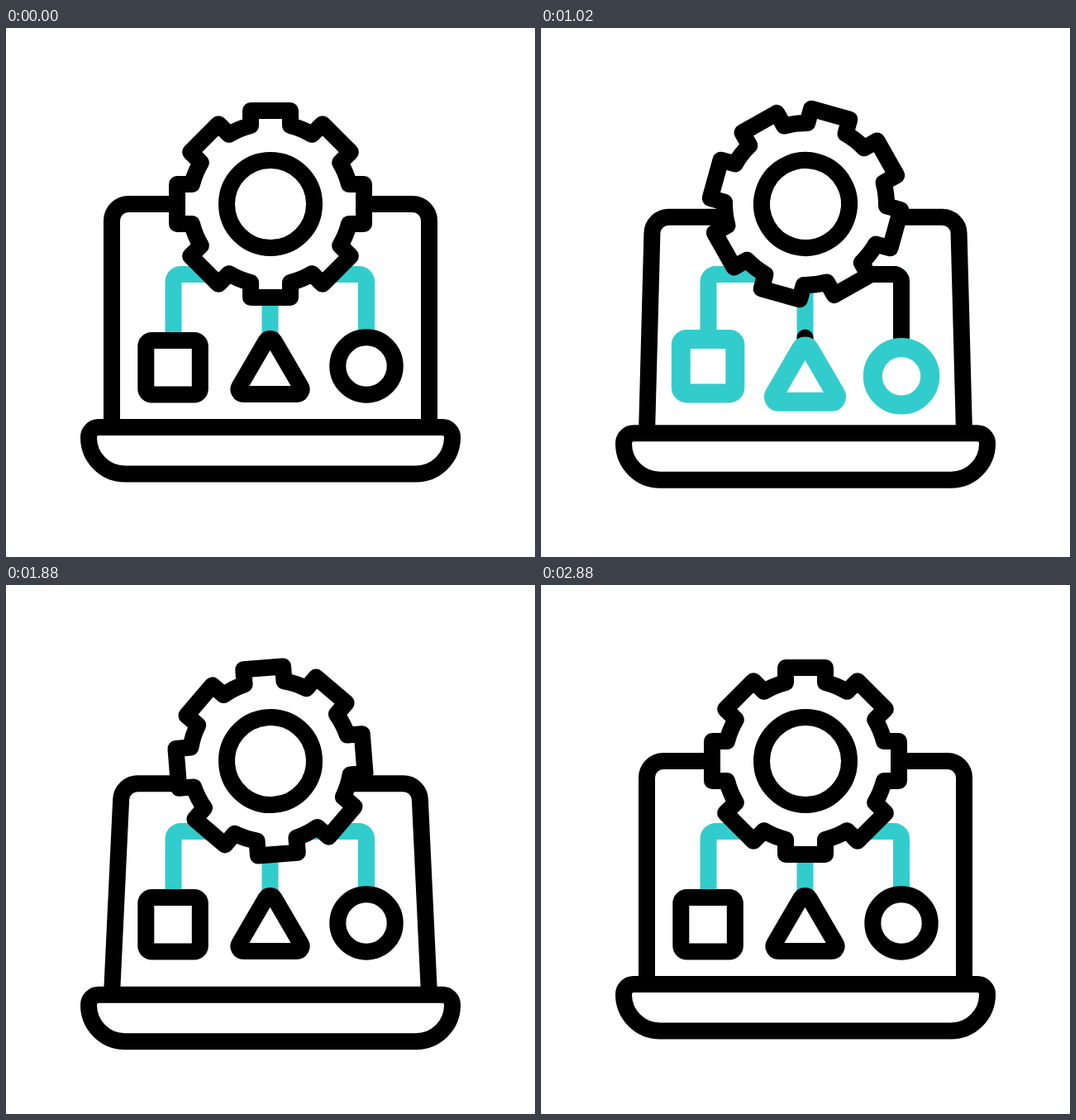
Recreate the animation shown at these times as an HTML page with a canvas. Size 640x640 px, loop 3200 ms.

```html
<!DOCTYPE html>
<html lang="en">
<head>
<meta charset="utf-8">
<title>Workflow</title>
<style>
html, body { margin: 0; height: 100%; overflow: hidden; background: #fff; }
canvas { display: block; width: 100vw; height: 100vh; }
</style>
</head>
<body>
<canvas id="stage" width="640" height="640"></canvas>
<script>
const ctx = document.getElementById('stage').getContext('2d');
const LOOP = 3200, MOVE = 2880, TEAL = '#33cccc', BLACK = '#000';

// Monotone cubic curve through [time, value] keys
function curve(keys) {
  const rate = keys.slice(1).map(([t, v], i) => (v - keys[i][1]) / (t - keys[i][0]));
  const slope = keys.map((_, i) => {
    const a = rate[i - 1] || 0, b = rate[i] || 0;
    return a * b > 0 ? 2 * a * b / (a + b) : 0;
  });
  return t => {
    const last = keys.length - 1;
    if (t <= keys[0][0]) return keys[0][1];
    if (t >= keys[last][0]) return keys[last][1];
    const i = keys.findIndex(k => k[0] > t) - 1;
    const [t0, v0] = keys[i], [t1, v1] = keys[i + 1];
    const h = t1 - t0, u = (t - t0) / h, w = 1 - u;
    return w * w * (1 + 2 * u) * v0 + u * u * (3 - 2 * u) * v1 +
      h * u * w * (w * slope[i] - u * slope[i + 1]);
  };
}

const spin = curve([[0, 0], [480, 38.2], [1020, 150.5], [1340, 226.5], [1880, 310.5], [2480, 349], [MOVE, 360]]);
const sway = curve([[0, 0], [340, -9], [480, -7], [1020, 7.3], [1340, 10.4], [1880, 12.7], [2160, 12], [2480, -9], [MOVE, 0]]);
const bounce = curve([[620, 0], [810, 13.2], [1115, -6], [1370, 4.3], [1560, 0]]);
const tint = curve([[620, 0], [720, 1], [1150, 1], [1290, 0]]);
const head = curve([[290, 0], [640, 1]]);
const tail = curve([[690, 0], [930, 1]]);

function stroke(color, width = 20) {
  ctx.strokeStyle = color;
  ctx.lineWidth = width;
  ctx.stroke();
}

// Closed polygon of [x, y, radius] corners
function rounded(points) {
  const [a, b] = points;
  ctx.beginPath();
  ctx.moveTo((a[0] + b[0]) / 2, (a[1] + b[1]) / 2);
  for (let i = 1; i <= points.length; i++) {
    const [x, y, r] = points[i % points.length];
    const next = points[(i + 1) % points.length];
    ctx.arcTo(x, y, next[0], next[1], r);
  }
  ctx.closePath();
}

function laptop(o) {
  const y = 483 + o, top = 213 + o * (o > 0 ? 2.15 : 1.75), dx = o * (o > 0 ? 0.95 : 0.65);
  ctx.beginPath();
  ctx.moveTo(128, y);
  ctx.arcTo(128 + dx, top, 320, top, 20);
  ctx.arcTo(512 - dx, top, 512, y, 20);
  ctx.lineTo(512, y);
  stroke(BLACK);
  rounded([[100, y, 12], [540, y, 12], [540, y + 56.5, 44], [100, y + 56.5, 44]]);
  stroke(BLACK);
}

const items = [
  { x: 202.5, length: 194, shape() { ctx.beginPath(); ctx.roundRect(169.3, 378, 65.5, 65.5, 7); } },
  { x: 319.5, length: 80, shape() { rounded([[277, 443, 6], [319.5, 370, 6], [362, 443, 6]]); } },
  { x: 436, length: 192, shape() { ctx.beginPath(); ctx.arc(436, 409, 34.7, 0, 7); } }
];

function connector({ x, length }, t) {
  ctx.beginPath();
  ctx.moveTo(320, 298);
  if (x === 319.5) ctx.moveTo(x, 298);
  else ctx.arcTo(x, 298, x, 378, 9);
  ctx.lineTo(x, 378);
  stroke(TEAL);
  const from = tail(t), to = head(t);
  if (to <= from) return;
  ctx.save();
  ctx.lineCap = 'round';
  ctx.setLineDash([length * (to - from), 999]);
  ctx.lineDashOffset = -length * from;
  stroke(BLACK);
  ctx.restore();
}

function symbol(item, t) {
  ctx.save();
  ctx.translate(0, bounce(t));
  item.shape();
  const a = tint(t);
  if (a < 1) stroke(BLACK);
  ctx.globalAlpha = a;
  if (a > 0) stroke(TEAL, 23);
  ctx.restore();
}

function gear(angle) {
  ctx.save();
  ctx.translate(320, 213);
  ctx.rotate(angle * Math.PI / 180);
  ctx.beginPath();
  const edge = Math.atan2(24, 95), r = Math.hypot(24, 95);
  for (let i = 0; i < 8; i++) {
    const mid = i * Math.PI / 4 - Math.PI / 2, c = Math.cos(mid), s = Math.sin(mid);
    for (const side of [-24, 24]) ctx.lineTo(113 * c - side * s, 113 * s + side * c);
    ctx.arc(0, 0, r, mid + edge, mid + Math.PI / 4 - edge);
  }
  ctx.closePath();
  ctx.fillStyle = '#fff';
  ctx.fill();
  stroke(BLACK);
  ctx.beginPath();
  ctx.arc(0, 0, 53, 0, 7);
  stroke(BLACK);
  ctx.restore();
}

function draw(now) {
  const t = Math.min(now % LOOP, MOVE);
  ctx.fillStyle = '#fff';
  ctx.fillRect(0, 0, 640, 640);
  ctx.lineJoin = 'round';
  laptop(sway(t));
  // Each branch repeats the first one a little later
  items.forEach((item, i) => connector(item, t - i * 120));
  items.forEach((item, i) => symbol(item, t - i * 120));
  gear(spin(t));
}

let start;
function tick(now) {
  start ??= now;
  draw(now - start);
  requestAnimationFrame(tick);
}
requestAnimationFrame(tick);
</script>
</body>
</html>
```
